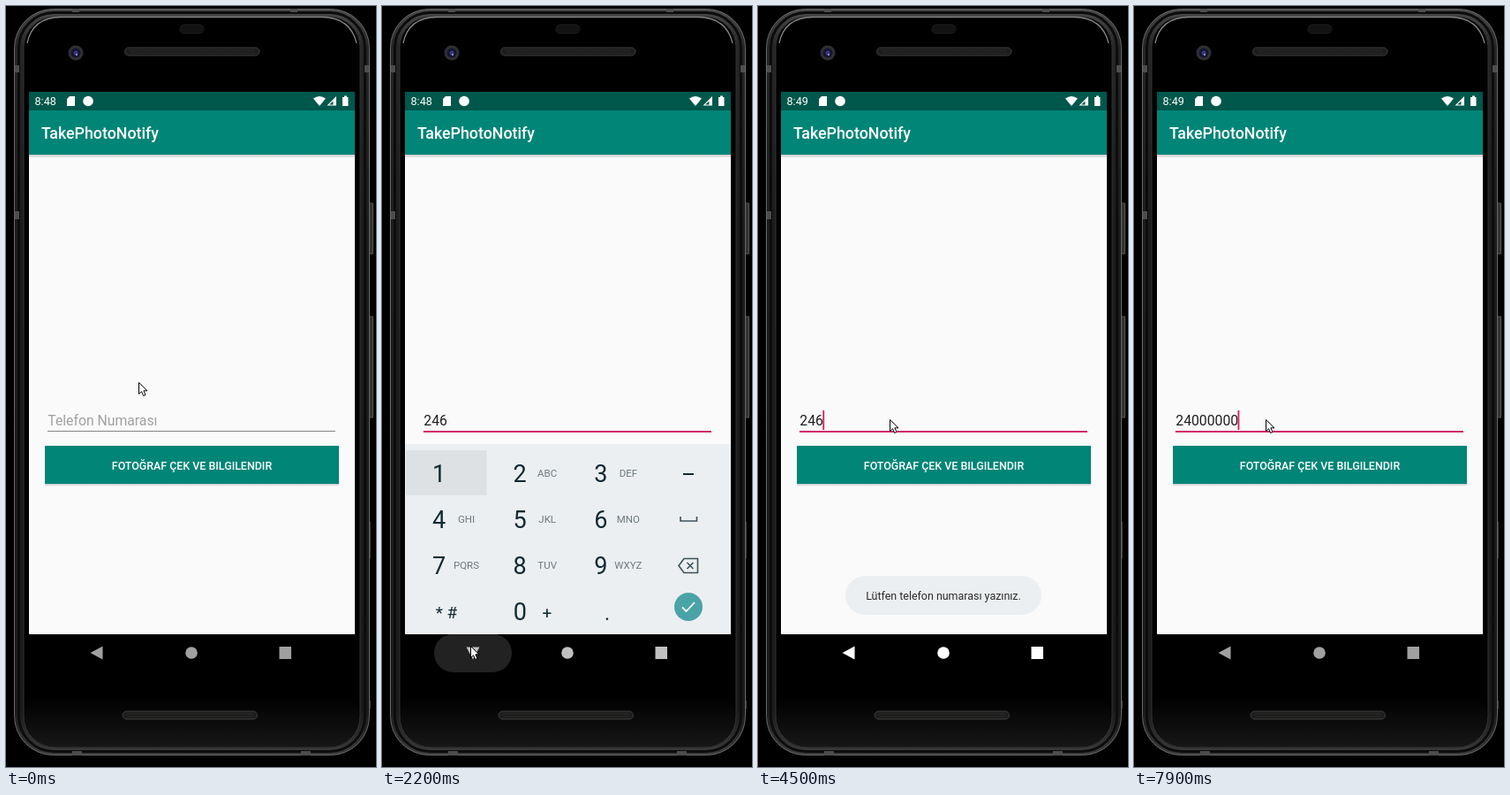
An HTML page for the animation above (8000 ms loop, 419x860 px).

```html
<!DOCTYPE html>
<html lang="tr">
<head>
<meta charset="utf-8">
<style>
  html, body { margin: 0; height: 100%; overflow: hidden; background: #000; }
  svg { display: block; width: 419px; height: 860px; font-family: Roboto, sans-serif; }
  .mid { text-anchor: middle; }
</style>
</head>
<body>
<svg viewBox="0 0 419 860">
  <defs>
    <linearGradient id="rim" x2="0" y2="1">
      <stop stop-color="#4a4a4a"/><stop offset=".05" stop-color="#262626"/>
      <stop offset=".3" stop-color="#1c1c1c"/><stop offset=".94" stop-color="#1a1a1a"/>
      <stop offset="1" stop-color="#3c3c3c"/>
    </linearGradient>
    <linearGradient id="glass" x2="0" y2="1">
      <stop offset=".93" stop-color="#000"/><stop offset="1" stop-color="#171717"/>
    </linearGradient>
    <linearGradient id="shade" x2="0" y2="1">
      <stop stop-color="#000" stop-opacity=".2"/><stop offset="1" stop-color="#000" stop-opacity="0"/>
    </linearGradient>
    <clipPath id="screen"><rect x="26" y="97" width="369" height="613"/></clipPath>
    <clipPath id="btnClip"><rect x="44" y="497" width="333" height="43"/></clipPath>
    <g id="speaker">
      <rect x=".5" y=".5" width="152.5" height="9" rx="4.5" fill="#1d1d1d" stroke="#3d3d3d"/>
      <path d="M6 3.5H148M7 6.5H148" stroke="#343430" stroke-dasharray="1 1"/>
    </g>
  </defs>

  <!-- phone body -->
  <path d="M411 223h4.5v57h-4.5zM411 351h4.5v114h-4.5z" fill="#333" stroke="#666" stroke-width=".8"/>
  <path d="M412.5 583v41M412.5 785v9" stroke="#3a3a3a"/>
  <rect x="9.5" y="3.5" width="402" height="843" rx="44" fill="url(#rim)" stroke="#686868"/>
  <rect x="14.5" y="7.5" width="392" height="835" rx="40" fill="none" stroke="#0c0c0c" stroke-width="3"/>
  <rect x="20" y="12" width="381" height="826" rx="35" fill="url(#glass)" stroke="#333"/>
  <path d="M24 42Q30 13 62 12.5H358Q390 13 397 42" fill="none" stroke="#858585" stroke-width="1.3"/>
  <path d="M10 67h5v8h-5zM10 232h5v9h-5zM406 67h5v8h-5zM75 842h11v5h-11zM334 842h11v5h-11zM75 3h8v4h-8zM322 3h8v4h-8z" fill="#4d4d4d"/>
  <rect x="197" y="21" width="27" height="10" rx="5" fill="#121212" stroke="#1d1d1d"/>
  <circle cx="79" cy="53" r="8.5" fill="#303035"/>
  <circle cx="79" cy="53" r="5.5" fill="#17172e"/>
  <circle cx="79" cy="53" r="2.5" fill="#3a3786"/>
  <circle cx="80" cy="55" r="1" fill="#aaaadd"/>
  <use href="#speaker" x="134" y="46.5"/>
  <use href="#speaker" x="131.5" y="796.5"/>

  <!-- app -->
  <g clip-path="url(#screen)">
    <path d="M26 97h369v613H26z" fill="#fafafa"/>
    <path d="M26 168h369v4H26z" fill="url(#shade)"/>
    <path d="M26 118h369v50H26z" fill="#008577"/>
    <path d="M26 97h369v21H26z" fill="#00574b"/>
    <g fill="#fff">
      <text id="clock" x="32.5" y="112" font-size="12.6"></text>
      <path d="M72 102h6v11h-9v-8z"/>
      <circle cx="93" cy="107.5" r="5.8"/>
      <path d="M348 104.5Q355 99.5 362 104.5L355 113z"/>
      <path d="M374 102v10.5h-10.5zM370.5 107.5l-4.5 4h4.5z" fill-rule="evenodd"/>
      <path d="M381 103h2v-1.5h3v1.5h1.5v10H381z"/>
      <text x="40" y="150" font-size="17.8" font-weight="500">TakePhotoNotify</text>
    </g>
    <text id="entry" x="47.3" y="474" font-size="15.75"></text>
    <path id="line"/>
    <path id="caret" d="M0 457v22" stroke="#d81b60" stroke-width="1.8"/>
    <path d="M44 540h333v3H44z" fill="url(#shade)"/>
    <path d="M44 497h333v43H44z" fill="#008577"/>
    <circle id="press" cx="156" cy="515" fill="#fff" clip-path="url(#btnClip)"/>
    <text class="mid" x="210.5" y="523.5" font-size="12.45" font-weight="500" fill="#fff">FOTOĞRAF ÇEK VE BILGILENDIR</text>
    <g id="toast">
      <rect x="99" y="644" width="222" height="44" rx="22" fill="#eceff1"/>
      <text class="mid" x="210" y="671" font-size="12.45" fill="#2b2b2b">Lütfen telefon numarası yazınız.</text>
    </g>
    <g id="board">
      <path d="M26 495h369v215H26z" fill="#eceff1"/>
      <path d="M27 502h91.5v51H27z" fill="#dee1e3"/>
      <g id="keys" class="mid" fill="#102a33"></g>
      <g fill="none" stroke="#3c525b" stroke-width="1.6">
        <path d="M341 529h12" stroke="#102a33" stroke-width="2"/>
        <path d="M338 577v5h18.5v-5"/>
        <path d="M342 624.5h15.5v16H342l-6-8zM345.5 629l7 7M352.5 629l-7 7"/>
      </g>
      <circle cx="347" cy="679" r="16" fill="#4aa3a7"/>
      <path d="M340 679.5l4.5 4.5 9.5-10" fill="none" stroke="#fff" stroke-width="1.8"/>
    </g>
  </g>

  <!-- navigation bar -->
  <rect id="ripple" y="709.5" height="43.5" rx="21.7" fill="#fff"/>
  <g id="nav">
    <path id="back" d="M95.5 731l14-7.5v15z"/>
    <circle cx="210" cy="731" r="6.8"/>
    <path d="M309.5 724h13.5v14h-13.5z"/>
  </g>
  <path id="boardIcon" d="M363 728.5h14M363 731.5h14M366 734.5h8" stroke="#a0a0a0" stroke-width="1.6" stroke-dasharray="2 1"/>
  <path id="mouse" d="M.5 .5V13.5L3.5 10.7 5.7 15.5 8 14.5 5.9 9.8H10z" fill="#fff" stroke="#000"/>
</svg>
<script>
const $ = id => document.getElementById(id);
const set = (id, attrs) => { for (const k in attrs) $(id).setAttribute(k, attrs[k]); };

const pad = ['1', '2 ABC', '3 DEF', '4 GHI', '5 JKL', '6 MNO', '7 PQRS', '8 TUV', '9 WXYZ'];
const label = (s, x, y, size, fill = '') =>
  `<text x="${x}" y="${y}" font-size="${size}" ${fill && `fill="${fill}"`}>${s}</text>`;
$('keys').innerHTML = pad.map((key, i) => {
  const [digit, letters = ''] = key.split(' ');
  const x = 64.5 + i % 3 * 91.7, y = 538 + (i / 3 | 0) * 52;
  return label(digit, x, y, 27) + label(letters, x + 31, y - 6, 11.5, '#6c797f');
}).join('') + label('* #', 73, 691.5, 19) + label('0', 156.3, 694, 27) +
  label('+', 187, 691.5, 19) + label('.', 255, 694, 23);

// [time, value...] points
const mouse = [[0, 150, 425], [400, 140, 478], [1200, 140, 478], [1500, 182, 416], [2000, 100, 723],
  [2200, 100, 723], [2400, 158, 511], [2700, 158, 511], [2800, 156, 515], [3100, 156, 515],
  [3500, 192, 438], [3800, 130, 390], [3900, 130, 390], [4500, 149, 467]];
const board = [[500, 0], [900, 1], [2200, 1], [2400, 0]];
const navGrey = [[2100, 160], [2200, 192], [2400, 255], [4900, 255], [5600, 160]];
const ripple = [[2100, 0, 40], [2200, .135, 44], [2400, .07, 48], [2700, .07, 48], [2800, 0, 48]];
const press = [[2900, 0, 0], [3000, .2, 60], [3200, .2, 230], [3500, 0, 230]];
const toast = [[3000, 0], [3400, 1], [6600, 1], [7100, 0]];

function at(points, t) {
  const i = points.findIndex(p => p[0] > t);
  if (i < 0) return points.at(-1).slice(1);
  if (!i) return points[0].slice(1);
  const a = points[i - 1], b = points[i], f = (t - a[0]) / (b[0] - a[0]);
  return a.slice(1).map((v, k) => v + (b[k + 1] - v) * f);
}

// each edit restarts the caret blink
const edits = [[600, ''], [1000, '2'], [1100, '24'], [1300, '246'], [4800, '24'], [4900, '2'], [5000, '']];
[5800, 6000, 6400, 6700, 7000, 7300, 7700, 7900].forEach((time, i) =>
  edits.push([time, '24000000'.slice(0, i + 1)]));

function draw(now) {
  const t = Math.floor(now % 8000 / 100) * 100;
  const focused = t >= 600;
  const [since, text] = edits.findLast(e => e[0] <= t) || [0, ''];

  $('clock').textContent = t < 3700 ? '8:48' : '8:49';
  $('entry').textContent = text || 'Telefon Numarası';
  set('entry', { fill: text ? '#212121' : '#a0a0a0' });
  set('line', focused
    ? { d: 'M47 481h326', stroke: '#cf2b6b', 'stroke-width': 1.8 }
    : { d: 'M47 480.5h326', stroke: '#858585', 'stroke-width': 1 });
  set('caret', {
    transform: `translate(${47.7 + 8.84 * text.length})`,
    opacity: +(focused && (t - since) % 1000 < 500)
  });

  const [open] = at(board, t);
  set('board', { opacity: open, transform: `translate(0 ${40 * (1 - open)})` });
  set('back', { transform: `rotate(${-90 * open} 103 731)` });
  set('boardIcon', { opacity: +(t >= 800 && t < 2200) });

  const grey = at(navGrey, t)[0];
  set('nav', { fill: `rgb(${grey},${grey},${grey})` });
  const [glow, half] = at(ripple, t);
  set('ripple', { opacity: glow, x: 103 - half, width: half * 2 });
  const [light, r] = at(press, t);
  set('press', { opacity: light, r });
  set('toast', { opacity: at(toast, t)[0] });
  set('mouse', { transform: `translate(${at(mouse, t).map(Math.round)})` });
}

const start = performance.now();
function loop() {
  draw(performance.now() - start);
  requestAnimationFrame(loop);
}
loop();
</script>
</body>
</html>
```
